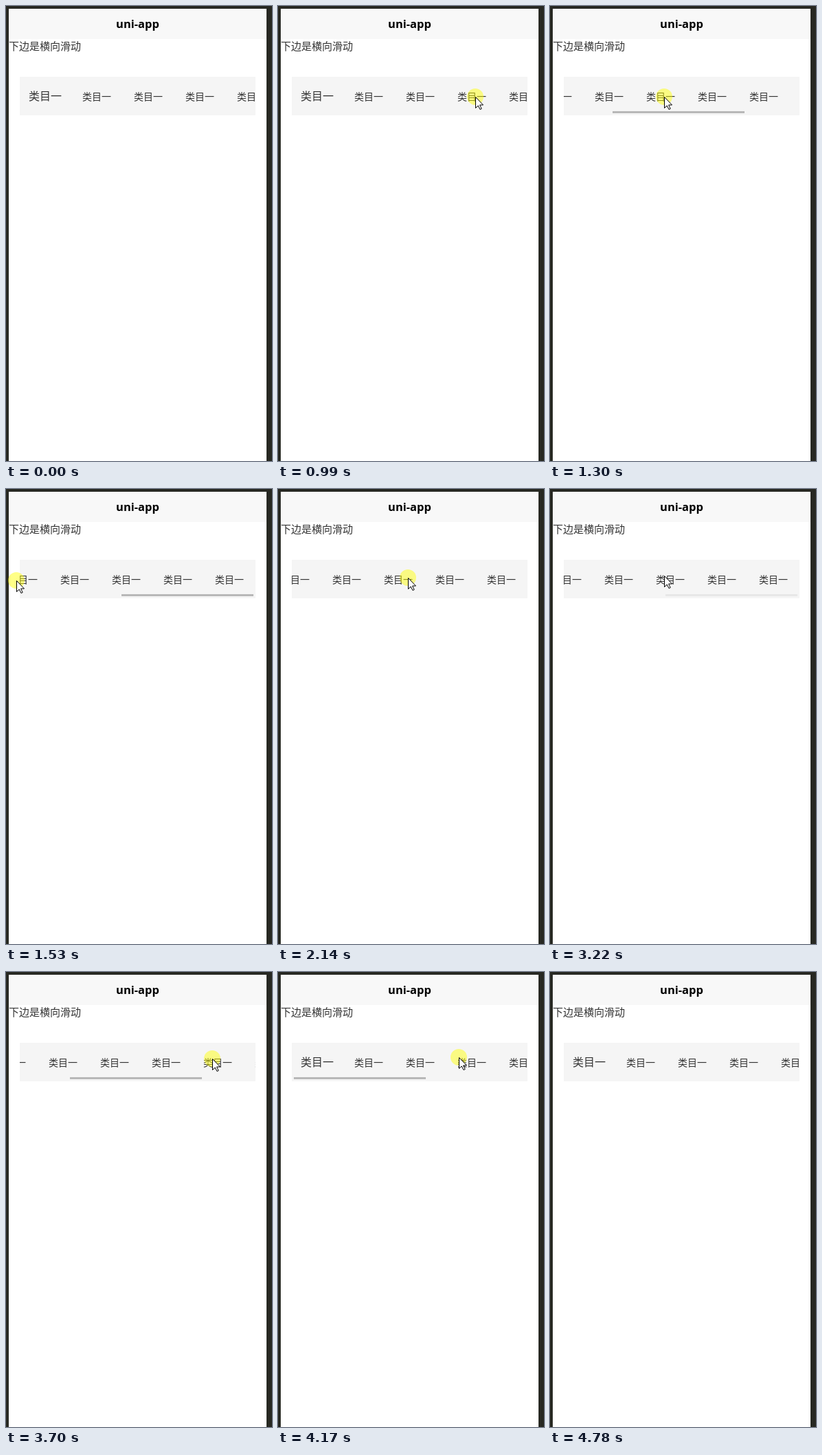
These frames come from a looping animation (387x662 px, 5.41 s). An HTML page:

```html
<!DOCTYPE html>
<html lang="zh-CN">
<head>
<meta charset="utf-8">
<title>uni-app</title>
<style>
  html, body { margin: 0; width: 100%; height: 100%; overflow: hidden; background: #272822; }
  svg { display: block; }
  text { font-family: "Noto Sans CJK SC", "Noto Sans CJK", sans-serif; fill: #333; }
  .title { font: bold 16.5px "Open Sans", "Noto Sans", sans-serif; fill: #000; text-anchor: middle; }
</style>
</head>
<body>
<svg width="387" height="662" viewBox="0 0 387 662">
  <defs>
    <clipPath id="view"><rect x="20" y="103" width="343" height="56"/></clipPath>
  </defs>
  <rect width="387" height="662" fill="#272822"/>
  <rect x="4" y="4" width="375" height="658" fill="#fff"/>
  <rect x="4" y="4" width="375" height="44" fill="#f8f8f8"/>
  <text class="title" x="191.5" y="32">uni-app</text>
  <text x="4" y="64" font-size="15">下边是横向滑动</text>
  <rect x="20" y="103" width="343" height="56" fill="#f5f5f5"/>
  <g clip-path="url(#view)"><g id="items"></g></g>
  <rect id="thumb" y="153" width="192" height="3"/>
  <g id="pointer">
    <circle id="halo" r="12" fill="#ff0" fill-opacity=".47"/>
    <path d="M.5 .5V16.5L4.2 13L7 18.5L9.2 17.5L6.6 12H11.5Z" fill="#fff" stroke="#000"/>
  </g>
</svg>
<script>
const LOOP = 5410, MAX_SCROLL = 257, THUMB_TRAVEL = 145;
const REFRESH = 77, PHASE = 58;   // screen refresh, ms
const HOLD = 120;                 // button stays down this long before and after a drag
const ENTER = 70, LEAVE = 4449;   // pointer is visible between these

const drags = [
  { start: 1090, end: 1521, from: [287, 132], to: [15, 133] },
  { start: 2250, end: 2370, from: [189, 129], to: [288, 128] },
  { start: 2595, end: 2910, from: [288, 128], to: [153, 127] },
  { start: 3480, end: 3600, from: [167, 126], to: [300, 126] },
  { start: 4020, end: 4139, from: [135, 122], to: [263, 124] }
];
const entry = { end: ENTER - HOLD, to: [362, 611] };
const exit = { start: LEAVE + HOLD, from: [340, 126] };

const $ = id => document.getElementById(id);
const items = $("items"), thumb = $("thumb"), pointer = $("pointer"), halo = $("halo");
const clamp = (v, lo, hi) => Math.min(hi, Math.max(lo, v));
const progress = (t, a, b) => clamp((t - a) / (b - a), 0, 1);
const smooth = k => k * k * (3 - 2 * k);
const easeOut = k => 1 - (1 - k) ** 3;
const mix = (p, q, k) => p.map((v, i) => Math.round(v + (q[i] - v) * k));

function addItem(x, size) {
  const el = document.createElementNS("http://www.w3.org/2000/svg", "text");
  el.setAttribute("x", x);
  el.setAttribute("y", 137);
  el.setAttribute("font-size", size);
  el.textContent = "类目一";
  items.append(el);
}
addItem(33, 16);
for (let i = 0; i < 7; i++) addItem(111 + 75 * i, 14);

const dragPoint = (d, t) => mix(d.from, d.to, smooth(progress(t, d.start, d.end)));

// Drag while the button is down, glide to the next press otherwise
function pointAt(t) {
  const i = drags.findIndex(d => t < d.end + HOLD);
  const next = drags[i] || exit, last = drags.at(i < 0 ? -1 : i - 1);
  const prev = i === 0 ? entry : last;
  if (t >= next.start - HOLD) return next === exit ? exit.from : dragPoint(next, t);
  return mix(prev.to, next.from, easeOut(progress(t, prev.end + HOLD, next.start - HOLD)));
}

const scrollAt = t => drags.reduce(
  (s, d) => clamp(s + d.from[0] - dragPoint(d, t)[0], 0, MAX_SCROLL), 0);

function thumbOpacity(t) {
  const d = drags.filter(d => t >= d.start).pop();
  const age = d ? t - d.end : Infinity;
  return age < 200 ? .25 : age < 450 ? .06 : 0;
}

function draw(time) {
  const t = Math.floor((time % LOOP - PHASE) / REFRESH) * REFRESH + PHASE;
  const s = scrollAt(t);
  const visible = time % LOOP >= ENTER && t < LEAVE;
  const held = drags.some(d => t >= d.start - HOLD && t < d.end + HOLD);
  items.setAttribute("transform", `translate(${-s} 0)`);
  thumb.setAttribute("x", 23 + Math.round(s / MAX_SCROLL * THUMB_TRAVEL));
  thumb.setAttribute("opacity", thumbOpacity(t));
  pointer.setAttribute("transform", `translate(${pointAt(t)})`);
  pointer.setAttribute("visibility", visible ? "visible" : "hidden");
  halo.setAttribute("opacity", held ? 1 : 0);
}

const start = performance.now();
function tick() {
  draw(performance.now() - start);
  requestAnimationFrame(tick);
}
tick();
</script>
</body>
</html>
```
